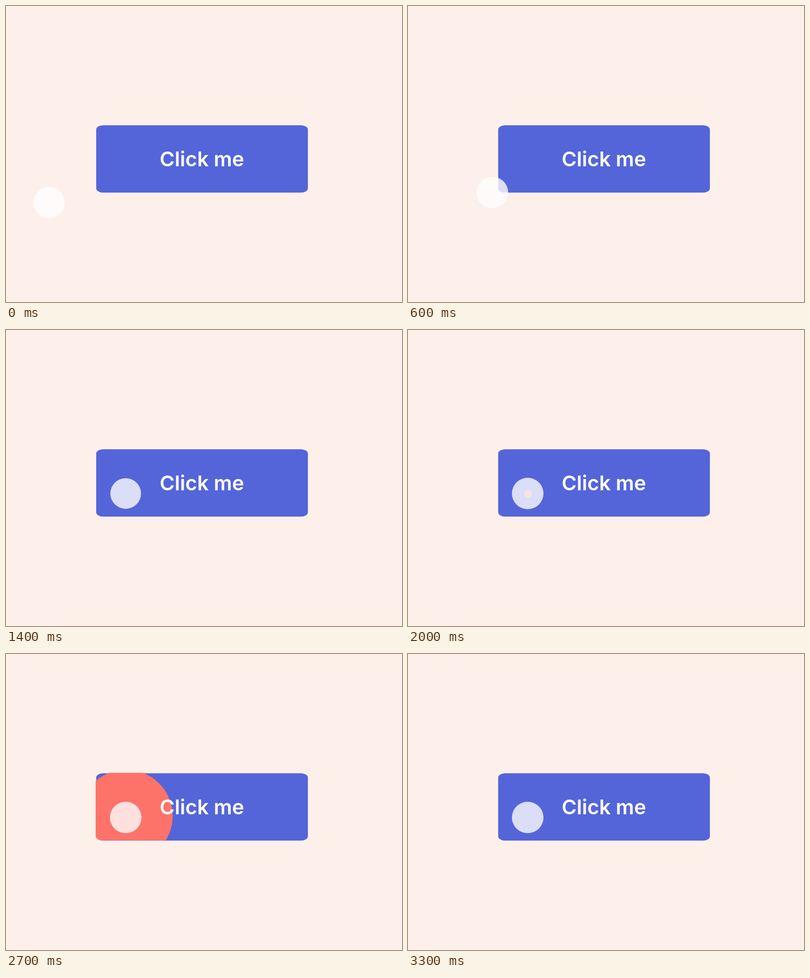
An HTML page with a canvas that plays this animation: 800 by 600 pixels, repeating every 4.1 s.

```html
<!DOCTYPE html>
<html lang="en">
<head>
<meta charset="utf-8">
<title>Click me</title>
<style>
  html, body { margin: 0; width: 100%; height: 100%; overflow: hidden; background: #fdefea; }
  canvas { display: block; }
</style>
</head>
<body>
<canvas id="stage" width="800" height="600"></canvas>
<script>
const ctx = document.getElementById('stage').getContext('2d');
const LOOP = 4100, STEP = 100;
const MOVE_END = 1280;
const PRESS = { start: 1335, end: 1870, depth: 6.4 };
const RIPPLE = { start: 1870, end: 3330, radius: 98.5 };
const PATH = [[87, 398.4], [137, 420.4], [233, 329.4], [241.8, 331.4]];

const clamp = v => Math.min(1, Math.max(0, v));
const ease = u => (1 - Math.cos(Math.PI * clamp(u))) / 2;

// Rises from 0 to 1 and back within the span
function pulse(t, { start, end }) {
  const u = clamp((t - start) / (end - start));
  return ease(1 - Math.abs(2 * u - 1));
}

function pathPoint(s) {
  const r = 1 - s;
  const weights = [r * r * r, 3 * s * r * r, 3 * s * s * r, s * s * s];
  return [0, 1].map(axis =>
    weights.reduce((sum, w, i) => sum + w * PATH[i][axis], 0));
}

function disc(x, y, r, color) {
  ctx.fillStyle = color;
  ctx.beginPath();
  ctx.arc(x, y, r, 0, Math.PI * 2);
  ctx.fill();
}

function buttonPath(x, y, w, h) {
  ctx.beginPath();
  ctx.roundRect(x, y, w, h, { x: 14, y: 9 });
}

function drawRipple(t) {
  const r = RIPPLE.radius * pulse(t, RIPPLE);
  if (r < 1) return;
  ctx.save();
  ctx.beginPath();
  ctx.roundRect(181.1, 240.8, 428, 137, [0, 0, { x: 14, y: 9 }, { x: 14, y: 9 }]);
  ctx.clip();
  disc(242.7, 332 - r * 0.037, r, '#fd7369');
  ctx.restore();
}

function drawLabel() {
  ctx.fillStyle = '#fff';
  ctx.font = '600 41px Inter, sans-serif';
  ctx.textAlign = 'center';
  ctx.fillText('Click me', 395.8, 325);
}

function draw(t) {
  ctx.fillStyle = '#fdefea';
  ctx.fillRect(0, 0, 800, 600);
  buttonPath(182.2, 241.7, 427.7, 136.6);
  ctx.fillStyle = '#5465d9';
  ctx.fill();
  drawRipple(t);
  drawLabel();
  const [x, y] = pathPoint(ease(t / MOVE_END));
  disc(x, y, 31.9 - PRESS.depth * pulse(t, PRESS), 'rgba(255,255,255,0.79)');
}

const begin = performance.now();
function tick() {
  const t = (performance.now() - begin) % LOOP;
  draw(Math.floor(t / STEP) * STEP);
  requestAnimationFrame(tick);
}
tick();
</script>
</body>
</html>
```
